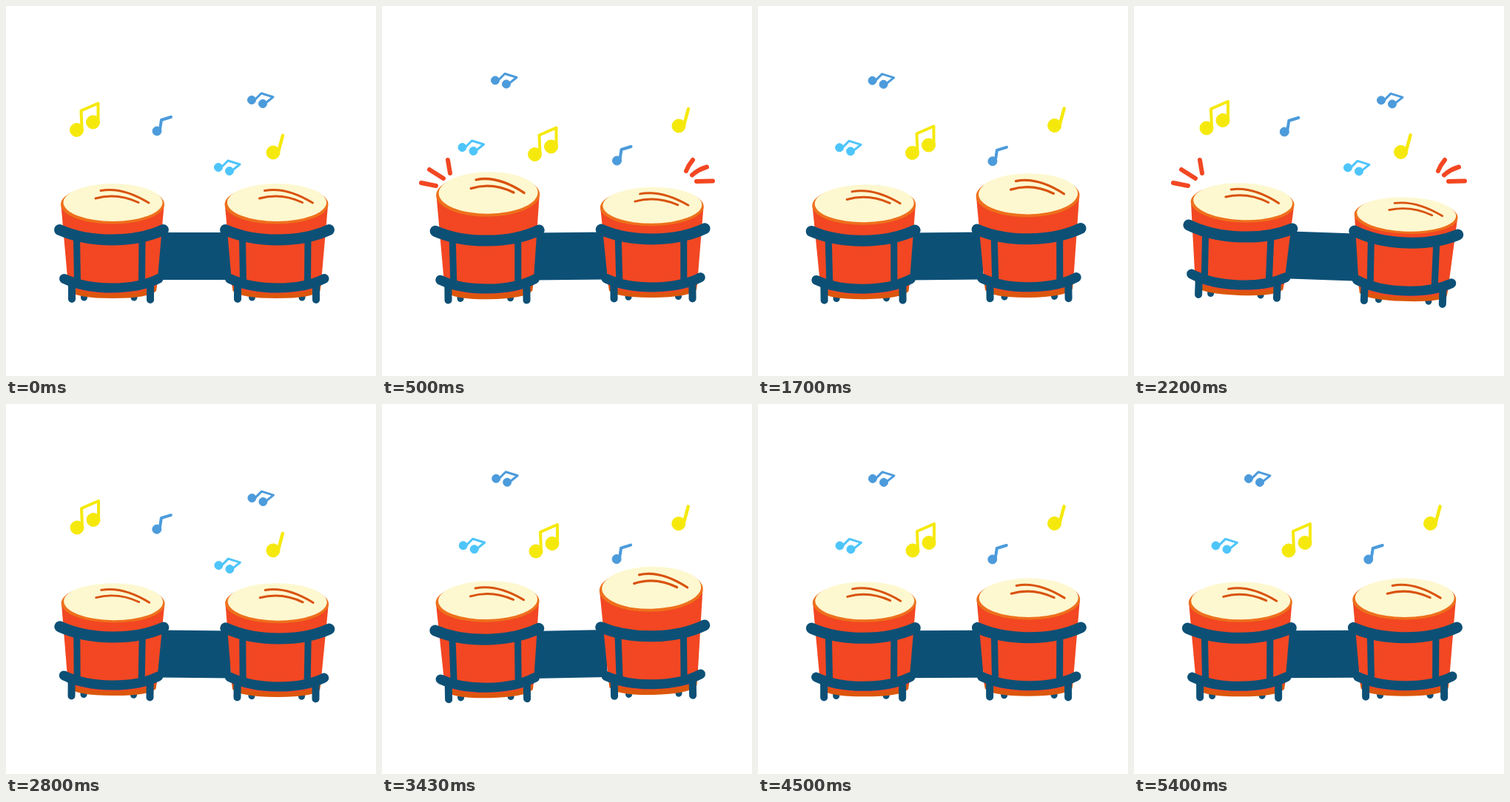
Recreate the animation shown at these times as an HTML page. Size 500 by 500 pixels, loop 5430 ms.

```html
<!DOCTYPE html>
<html lang="en">
<head>
<meta charset="utf-8">
<title>Bongo drums</title>
<style>
  html, body { margin: 0; width: 100%; height: 100%; overflow: hidden; background: #fff; }
  svg { display: block; width: 100%; height: 100%; }
  .line { fill: none; stroke-linecap: round; stroke-linejoin: round; }
</style>
</head>
<body>
<svg viewBox="0 0 500 500">
  <defs>
    <g id="shell">
      <path fill="#dc560d" d="M83 370L85 385Q95 395 144 395Q193 395 203 385L205 370Z"/>
      <path fill="#f24722" d="M74.500 270L84 378Q100 389 144 389Q188 389 204 378L213.500 270Z"/>
      <ellipse fill="#ee701c" cx="144" cy="268" rx="70" ry="26.500"/>
      <ellipse fill="#fdf8d0" cx="144.500" cy="265.500" rx="67" ry="25.500"/>
      <path class="line" stroke="#d9530f" stroke-width="3" d="M128 249.500Q157 244 193 266M121 260Q150 252 179 265.500"/>
    </g>
    <path id="backLegs" class="line" stroke-width="9" d="M105.500 380V394M173 380V394"/>
    <g id="frame" class="line">
      <path stroke-width="15" d="M72.500 302.500Q103 316 143 316Q183 316 212.500 302.500"/>
      <path stroke-width="13" d="M78.500 368.500Q105 381 143 381Q181 381 206 368.500"/>
      <path stroke-width="9" d="M95.500 314L96.500 374M184 314L183.500 374"/>
      <path stroke-width="10" d="M89 374V396M195 374V397"/>
    </g>
    <g id="pair">
      <circle r="9"/><circle cx="22" cy="-10.500" r="9"/>
      <path class="line" stroke-width="4" d="M7 -1L6 -26L29 -36V-11"/>
    </g>
    <g id="smallPair">
      <circle r="5.500"/><circle cx="15" cy="5" r="5.500"/>
      <path class="line" stroke-width="3" d="M4 0L13 -9L29 -4L19 4"/>
    </g>
    <g id="quarter">
      <circle r="9"/>
      <path class="line" stroke-width="4.500" d="M7 -1L13 -23"/>
    </g>
    <g id="eighth">
      <circle r="6"/>
      <path class="line" stroke-width="4" d="M4 -2L6 -15L19 -19"/>
    </g>
  </defs>

  <g id="bongos" stroke="#0d5076">
    <path fill="#0d5076" stroke="none" d="M204 306H304V370H204Z"/>
    <use href="#backLegs"/>
    <use href="#backLegs" x="227"/>
    <g id="left" stroke="none"><use href="#shell"/></g>
    <g id="right" stroke="none"><use href="#shell" x="221.500"/></g>
    <use href="#frame"/>
    <use href="#frame" x="224"/>
  </g>
  <path id="sparks" class="line" stroke="#f24722" stroke-width="6"
    d="M53 239L73 243M64 221L83 233M89 208L92 226M420 208Q414 215 411 223M439 217.500Q427 221 419 228.500M425 237L447 236.500"/>
  <g id="notes"></g>
</svg>
<script>
const $ = id => document.getElementById(id);
const POSES = 13, POSE_MS = 70, TICK_MS = 100 / 3, LOOP_MS = 5430;
const SWITCH = 7; // pose at which the notes jump to their second places

// Eases with a cosine between [pose, value] turning points.
function swing(pose, points) {
  const i = points.findIndex(([end]) => end > pose);
  const [p0, v0] = points[i - 1], [p1, v1] = points[i];
  const ease = (1 - Math.cos(Math.PI * (pose - p0) / (p1 - p0))) / 2;
  return v0 + (v1 - v0) * ease;
}

const tilt = [[0, 0], [3.6, 2.9], [8.5, -1.5], [POSES, 0]];
const stretch = {
  left: [[0, 1], [3.3, .9], [7.4, 1.115], [11, 1], [POSES, 1]],
  right: [[0, 1], [5.5, .905], [9.8, 1.118], [POSES, 1]]
};

// shape, colour, drift, then the two places
const notes = [
  ['pair', '#f5e90c', [2.5, -2.5], [95.5, 167.5], [206.5, 200.5]],
  ['eighth', '#4c9bdb', [-.7, 1], [204, 169], [317.5, 209]],
  ['smallPair', '#4c9bdb', [2, .4], [332, 127], [153, 100.5]],
  ['quarter', '#f5e90c', [-.4, -.6], [361, 198], [401, 162]],
  ['smallPair', '#4ec5fa', [2, .4], [287, 218], [108.5, 191]]
].map(([shape, colour, drift, ...places]) => {
  const el = document.createElementNS('http://www.w3.org/2000/svg', 'use');
  el.setAttribute('href', '#' + shape);
  el.setAttribute('fill', colour);
  el.setAttribute('stroke', colour);
  $('notes').append(el);
  return { el, drift, places };
});

const move = (el, value) => el.setAttribute('transform', value);

function draw(pose) {
  move($('bongos'), `rotate(${swing(pose, tilt)} 255 340)`);
  for (const side in stretch)
    move($(side), `translate(0 394) scale(1 ${swing(pose, stretch[side])}) translate(0 -394)`);
  $('sparks').style.display = pose >= 3 && pose <= 8 ? '' : 'none';

  const second = pose >= SWITCH;
  const k = (second ? pose - SWITCH : pose) / 5;
  for (const { el, drift: [dx, dy], places } of notes) {
    const [x, y] = places[+second];
    move(el, `translate(${x + dx * k} ${y + dy * k})`);
  }
}

const start = performance.now();
function tick() {
  const t = (performance.now() - start) % LOOP_MS;
  const clock = Math.floor((t + 4) / TICK_MS) * TICK_MS; // poses change on a 30 Hz clock
  draw(Math.floor(clock / POSE_MS + 1e-6) % POSES);
  requestAnimationFrame(tick);
}
tick();
</script>
</body>
</html>
```
